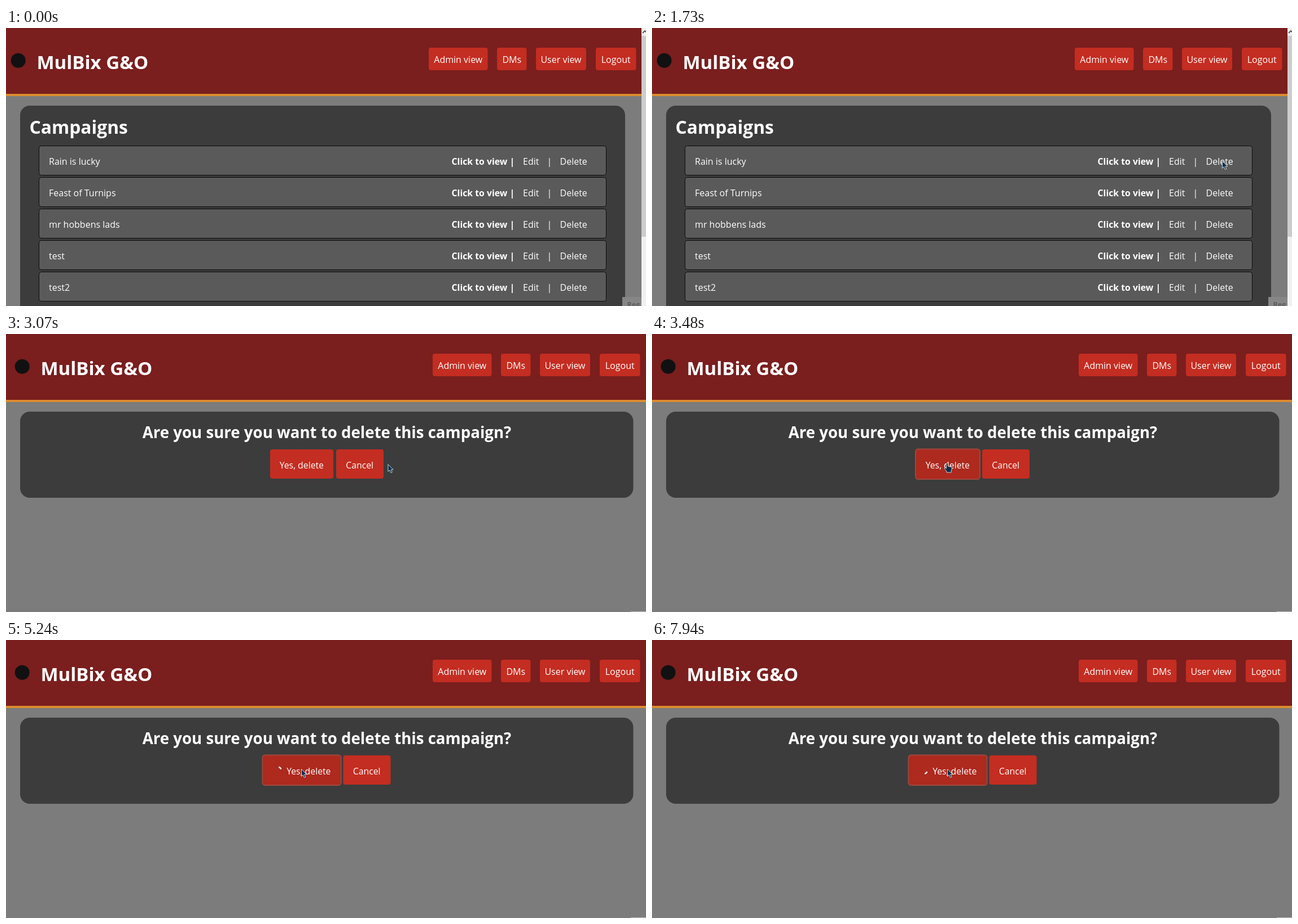
Recreate the animation shown at these times as an HTML page. Size 1134 by 494 pixels, loop 7.99 s.

```html
<!DOCTYPE html>
<html lang="en">
<head>
<meta charset="utf-8">
<title>Campaigns</title>
<style>
  html, body { margin: 0; width: 100%; height: 100%; overflow: hidden; background: #7c7c7c; }
  svg { display: block; }
  text { font: 16px "Open Sans", "Noto Sans", sans-serif; fill: #fff; white-space: pre; }
  .bold { font-weight: 700; }
  .title { font-size: 33px; font-weight: 700; }
  .head { font-size: 31.8px; font-weight: 700; }
  .ask { font-size: 27.65px; font-weight: 700; }
  .view { font-size: 15.8px; font-weight: 700; }
  .btn { font-size: 15.8px; }
  .mid { text-anchor: middle; }
  .pointer { fill: #0d2f4d; stroke: #e8eef2; stroke-width: .85; stroke-linejoin: round; }
</style>
</head>
<body>
<svg id="stage" width="1134" height="494" viewBox="0 0 1134 494"></svg>
<script>
const LOOP = 7990;
const stage = document.getElementById("stage");

const rect = (x, y, w, h, fill, r = 0, more = "") =>
  `<rect x="${x}" y="${y}" width="${w}" height="${h}" rx="${r}" fill="${fill}" ${more}/>`;
const text = (x, y, str, cls = "") =>
  `<text x="${x}" y="${y}" class="${cls}">${str.replace(/&/g, "&amp;")}</text>`;

const navButton = ([x, w, label]) =>
  rect(x, 35, w, 40, "#c42d21", 4) + text(x + w / 2, 62, label, "mid");

const row = (name, i) => {
  const y = 209.5 + i * 56, base = y + 33.5;
  return rect(58.5, y, 1005, 52, "#5a5a5a", 4, 'stroke="#0a0a0a"') +
    text(76, base, name) +
    text(789.5, base, "Click to view", "view") +
    text(897, base, "|", "bold mid") +
    text(916, base, "Edit") +
    text(963, base, "|", "mid") +
    text(981.5, base, "Delete");
};

const nav = [[749, 104.5, "Admin view"], [870, 52.5, "DMs"], [939, 89, "User view"], [1045, 71.5, "Logout"]];
const names = ["Rain is lucky", "Feast of Turnips", "mr hobbens lads", "test", "test2"];

stage.innerHTML = `
  <defs><clipPath id="altBox"><rect x="8" y="44" width="28" height="28"/></clipPath></defs>
  ${rect(0, 0, 1134, 494, "#7c7c7c")}
  ${rect(0, 0, 1134, 117, "#7a1e1e")}
  ${rect(0, 117, 1134, 4, "#dc8c2e")}
  <g id="header">
    <circle id="logo" cx="21.7" cy="57.7" r="13" fill="#111"/>
    <g id="alt" clip-path="url(#altBox)">${text(9.5, 64, "D20")}</g>
    ${text(54.5, 73, "MulBix G&O", "title")}
    ${nav.map(navButton).join("")}
  </g>
  <g id="list">
    ${rect(25, 138, 1072, 400, "#3c3c3c", 17)}
    ${text(41.5, 188, "Campaigns", "head")}
    ${names.map(row).join("")}
    ${rect(1092, 478, 34, 16, "#868686")}
    <text x="1100.5" y="496" class="bold" style="font-size:12.5px;fill:#5c5c5c">Reg</text>
    ${rect(1126, 0, 8, 494, "#f0f0f0")}
    ${rect(1126, 14, 8, 357, "#cdcdcd")}
    <path d="M1128 9L1132 5L1136 9" fill="none" stroke="#505050" stroke-width="1.8"/>
  </g>
  <g id="dialog">
    ${rect(25, 138, 1086.5, 153, "#3c3c3c", 17)}
    ${text(568.5, 184.5, "Are you sure you want to delete this campaign?", "ask mid")}
    <rect id="yes" y="205" height="52" rx="4"/>
    <rect id="ring" y="204.5" height="53.5" rx="4.5" fill="none" stroke="#a1463b" stroke-width="2"/>
    <g id="yesText">${text(484.7, 239, "Yes, delete", "btn")}</g>
    <g id="cancel">${rect(585, 205, 84, 52, "#c42d21", 4)}${text(626.7, 239, "Cancel", "btn mid")}</g>
    <path id="spin" fill="none" stroke="#fff" stroke-width="2.5" stroke-linecap="round"/>
    ${rect(1107, 493, 27, 1, "#c4c4c4")}
  </g>
  <g id="cursor" class="pointer">
    <path id="arrow" d="M.5 .5V13.2L3.3 10.6L5.5 15.4L7.9 14.3L5.8 9.8H9.8Z"/>
    <path id="hand" d="M-1.5 1Q0 -1 1.5 1V6L7 7.3Q8.7 8 8.4 10.5L7.2 14V17H-1V15L-4.6 10.5Q-5 8.2 -3 8.6L-1.5 10Z"/>
  </g>`;

const el = {};
stage.querySelectorAll("[id]").forEach(n => el[n.id] = n);
const show = (node, on) => node.setAttribute("visibility", on ? "inherit" : "hidden");
const shift = (node, x, y = 0) => node.setAttribute("transform", `translate(${x} ${y})`);

// Screen refreshes: first time, last time, number of refreshes.
const ticks = [
  [70, 70, 1], [260, 470, 4], [730, 1000, 5], [1730, 1730, 1], [2460, 2460, 1],
  [2790, 3270, 8], [3480, 3480, 1], [3620, 3690, 2], [3880, 4660, 12], [4700, 5440, 12],
  [5510, 6240, 10], [6320, 6320, 1], [6510, 6850, 5], [7040, 7580, 9], [7720, 7940, 4]
];

function lastRefresh(t) {
  let at = 0;
  for (const [from, to, n] of ticks) {
    if (t < from) break;
    const gap = n > 1 ? (to - from) / (n - 1) : 1;
    at = from + Math.min(n - 1, Math.floor((t - from) / gap + 1e-6)) * gap;
  }
  return at;
}

// Pointer moves: start, end, destination.
const moves = [[190, 470, 1034, 219], [660, 1000, 1010, 236], [2720, 3270, 523, 229]];

function pointerAt(t) {
  let x = 1068, y = 428;
  for (const [from, to, toX, toY] of moves) {
    const p = Math.min(1, Math.max(0, (t - from) / (to - from)));
    const k = p * p * (3 - 2 * p);
    x += (toX - x) * k;
    y += (toY - y) * k;
  }
  return [x, y];
}

function drawSpinner(t) {
  const mid = (-45 + (t - 5240) / 830 * 360) * Math.PI / 180;
  const half = 0.2 + 0.13 * Math.cos(mid);
  const point = a => `${(481.3 + 6.4 * Math.cos(a)).toFixed(2)} ${(231.7 + 6.4 * Math.sin(a)).toFixed(2)}`;
  el.spin.setAttribute("d", `M${point(mid - half)}A6.4 6.4 0 0 1 ${point(mid + half)}`);
}

function render(time) {
  const t = lastRefresh(time);
  const asking = t >= 2460, focused = t >= 3480, busy = t >= 3620;
  const [x, y] = pointerAt(t);
  const hover = asking && x > 468 && x < 580;

  show(el.list, !asking);
  show(el.dialog, asking);
  shift(el.header, asking ? 7 : 0);
  const loading = asking && t < 2790;
  show(el.logo, !loading);
  show(el.alt, loading);

  const grow = busy ? 12.5 : 0;
  el.yes.setAttribute("x", 468 - grow);
  el.yes.setAttribute("width", 112 + 2 * grow);
  el.yes.setAttribute("fill", hover ? "#ae291e" : "#c42d21");
  el.ring.setAttribute("x", 467 - grow);
  el.ring.setAttribute("width", 114 + 2 * grow);
  show(el.ring, focused);
  shift(el.yesText, grow);
  shift(el.cancel, grow);
  show(el.spin, busy);
  drawSpinner(t);

  const hand = asking ? hover && !busy : t >= 460 && t < 1730;
  show(el.cursor, t >= 70);
  show(el.hand, hand);
  show(el.arrow, !hand);
  shift(el.cursor, x, y);
}

let start;
function frame(now) {
  start ??= now;
  render((now - start) % LOOP);
  requestAnimationFrame(frame);
}
render(0);
requestAnimationFrame(frame);
</script>
</body>
</html>
```
